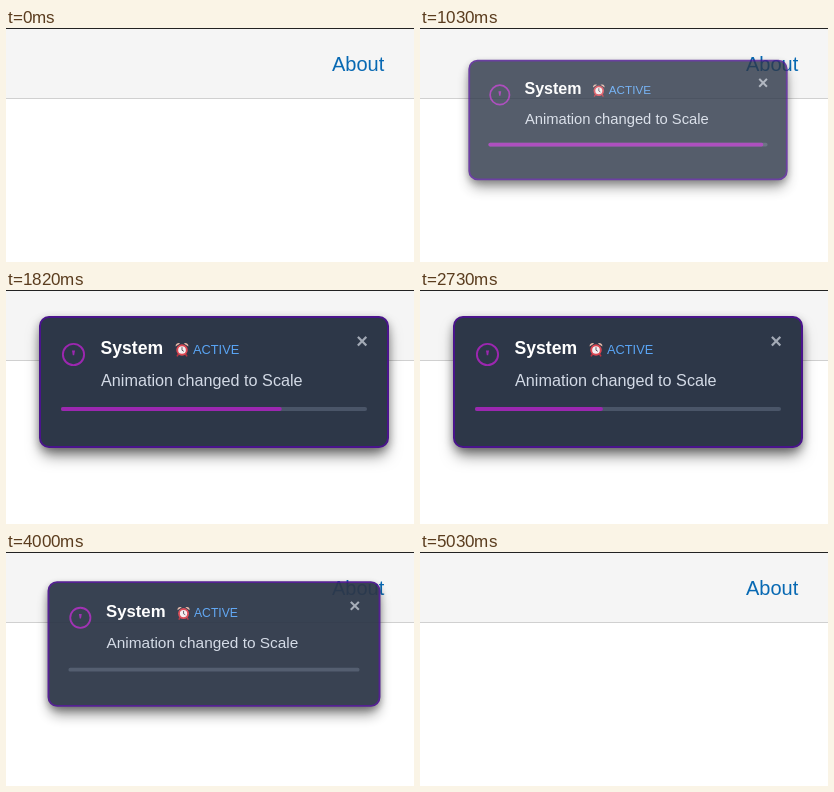
Recreate the animation shown at these times as an HTML page. Size 408 px wide and 234 px high, loop 5.18 s.

```html
<!DOCTYPE html>
<html lang="en">
<head>
<meta charset="utf-8">
<title>Scale notification</title>
<style>
  html, body { margin: 0; width: 100%; height: 100%; overflow: hidden; background: #fff; }
  .stage { position: relative; width: 408px; height: 234px; overflow: hidden; }
  .stage, text { font-family: "Liberation Sans", Arial, sans-serif; }
  svg { position: absolute; display: block; }
  .header { left: 0; top: 0; }
  .toast {
    position: absolute; left: 33px; top: 26px; width: 350px; height: 132px;
    box-sizing: border-box; border: 2px solid #4a148c; border-radius: 10px;
    background: #2d3748; box-shadow: 0 10px 15px -3px rgba(0, 0, 0, .5), 0 3px 8px rgba(0, 0, 0, .3);
    visibility: hidden;
  }
  .toast svg { left: -2px; top: -2px; }
</style>
</head>
<body>
<div class="stage">
  <svg class="header" width="408" height="72">
    <rect width="408" height="70" fill="#f5f5f5"/>
    <rect width="408" height="1" fill="#222"/>
    <rect y="70" width="408" height="1" fill="#d0d0d0"/>
    <text x="326" y="43" font-size="20" fill="#0869b3">About</text>
  </svg>
  <div class="toast" id="toast">
    <svg width="350" height="132" viewBox="33 26 350 132">
      <circle cx="67.5" cy="64.5" r="10.6" fill="none" stroke="#9c27b0" stroke-width="1.9"/>
      <path d="M66 60.5h3l-.8 4.8h-1.4z" fill="#9c27b0"/>
      <text x="94.5" y="64" font-size="17.6" font-weight="bold" fill="#fff">System</text>
      <!-- alarm clock -->
      <g>
        <path d="M172.5 64l-1.5 2.4M179.5 64l1.5 2.4" stroke="#b8323f" stroke-width="1.6"/>
        <path d="M169.6 56.4a3 3 0 0 1 4.6-2.9zM182.4 56.4a3 3 0 0 0-4.6-2.9z" fill="#e8b9a8"/>
        <circle cx="176" cy="60" r="4.8" fill="#f4eef0" stroke="#dc4652" stroke-width="1.9"/>
        <path d="M176 57.2V60.2L177.8 61.3" fill="none" stroke="#4a4450" stroke-width=".9"/>
      </g>
      <text x="187" y="64" font-size="12.8" fill="#5aa5f5">ACTIVE</text>
      <text x="350.3" y="58" font-size="20" font-weight="bold" fill="#a3aab6">×</text>
      <text x="95" y="96" font-size="16.2" fill="#d3dae6">Animation changed to Scale</text>
      <rect x="55" y="117" width="306" height="4" rx="2" fill="#4a5568"/>
      <rect id="bar" x="55" y="117" width="306" height="4" rx="2" fill="#9c27b0"/>
    </svg>
  </div>
</div>
<script>
const LOOP = 5180;
const ENTER = { at: 917, span: 350 };
const COUNT = { at: 985, span: 3000 };
const LEAVE = { at: 3961, span: 226 };

const toast = document.getElementById('toast');
const bar = document.getElementById('bar');

const phase = (t, { at, span }) => Math.min(1, Math.max(0, (t - at) / span));
const bezier = (a, b, s) => 3 * a * s * (1 - s) ** 2 + 3 * b * s * s * (1 - s) + s ** 3;

// cubic-bezier(.25, .1, .25, 1)
function ease(x) {
  if (x <= 0 || x >= 1) return x;
  let lo = 0, hi = 1;
  for (let i = 0; i < 24; i++) {
    const mid = (lo + hi) / 2;
    if (bezier(.25, .25, mid) < x) lo = mid; else hi = mid;
  }
  return bezier(.1, 1, lo);
}

function draw() {
  const t = performance.now() % LOOP;
  const shown = ease(phase(t, ENTER)) - ease(phase(t, LEAVE));
  toast.style.visibility = shown > 0 ? 'visible' : 'hidden';
  toast.style.transform = `scale(${.8 + .2 * shown})`;
  toast.style.opacity = 1 - (1 - shown) ** 2;
  bar.setAttribute('width', 306 * (1 - phase(t, COUNT)));
  requestAnimationFrame(draw);
}
draw();
</script>
</body>
</html>
```
